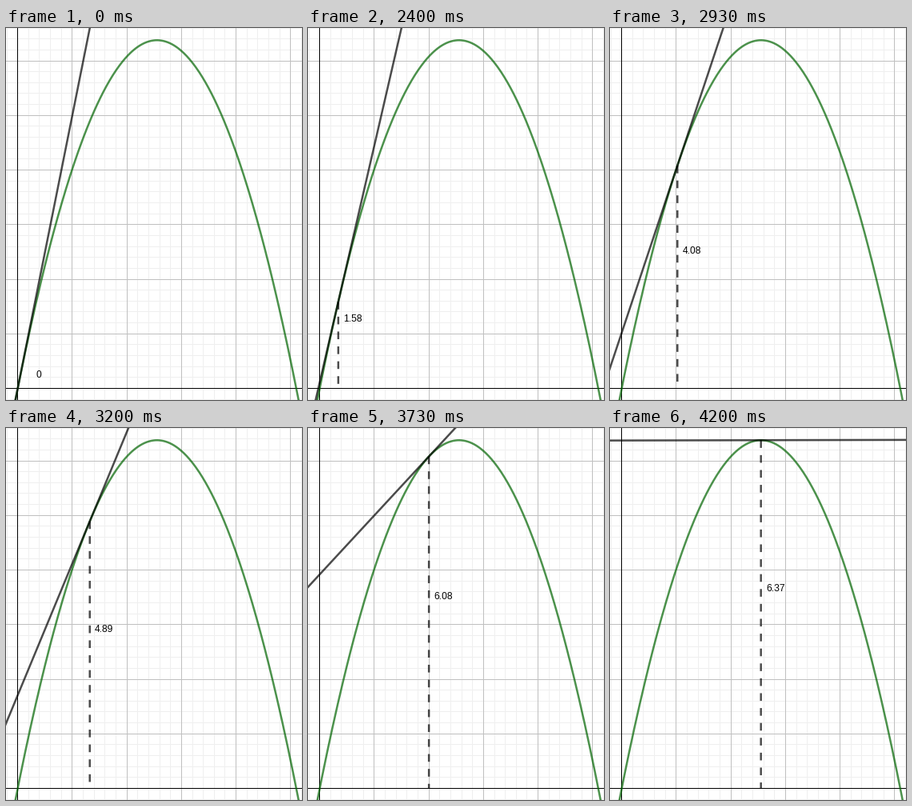
These frames come from a looping animation (370x465 px, 6.27 s). A matplotlib script:

```python
import numpy as np
import matplotlib.pyplot as plt
from matplotlib.animation import FuncAnimation

W, H, DPI = 370, 465, 100
PX = 72 / DPI                  # points per pixel
UNIT = 68.245                  # pixels per major grid cell
OX, OY = 14.15, 450            # pixel column and row of the origin
TICK, LOOP = 10, 6270          # ms
START, STEPS, LAST = 2200, 30, 60


def px(x):
    return OX + 0.5 + UNIT * x


def py(y):
    return OY + 0.5 - UNIT * y


def height(x):
    return 5 * x - 0.98 * x * x


def grid_image():
    img = np.full((H, W, 3), 255, np.uint8)
    for cell, shade in ((UNIT / 5, 239), (UNIT, 192)):
        for k in range(-2, 40):
            col, row = round(OX + k * cell), round(OY - k * cell)
            if 0 <= col < W:
                img[:, col] = shade
            if 0 <= row < H:
                img[row] = shade
    img[:, round(OX)] = img[OY] = 0
    return img


def hundredths(t):
    """Position of the touching point, in hundredths of a unit."""
    if t < START:
        return 0
    i = min(STEPS, (t - START + 4) * 3 // 200)
    k = 2 - (-(LAST - 2) * i // STEPS)
    return int(k * 255 / LAST + 0.5)


fig = plt.figure(figsize=(W / 100, H / 100), dpi=DPI, facecolor="white")
fig.figimage(grid_image(), zorder=-1)
ax = fig.add_axes([0, 0, 1, 1])
ax.set(xlim=(0, W), ylim=(H, 0))
ax.axis("off")

style = dict(lw=2.5 * PX, alpha=0.7, snap=False)
xs = np.linspace(-0.3, 5.4, 300)
ax.plot(px(xs), py(height(xs)), color="#006400", **style)
tangent, = ax.plot([], [], color="black", **style)
drop, = ax.plot([], [], color="black", dash_capstyle="butt",
                dashes=(9.6 / 2.5, 9 / 2.5), **style)
label = ax.text(0, 0, "", family="Liberation Sans", size=12 * PX,
                color="black", va="baseline", ha="left")


def update(frame):
    n = hundredths(frame * TICK)
    x = n / 100
    y = height(x)
    ends = np.array([-1.0, 6.0])
    tangent.set_data(px(ends), py(y + (5 - 1.96 * x) * (ends - x)))
    drop.set_data([px(x)] * 2, [py(y), py(0)])
    drop.set_visible(n > 0)
    # the value is cut, not rounded, to two decimals
    label.set_text(f"{(50000 * n - 98 * n * n) // 10000 / 100:g}")
    label.set_position((px(x) + 6.5, round(py(y / 2) - 29)) if n else (37, 437))
    return tangent, drop, label


anim = FuncAnimation(fig, update, frames=LOOP // TICK, interval=TICK,
                     repeat=True, repeat_delay=0)
plt.show()
```
